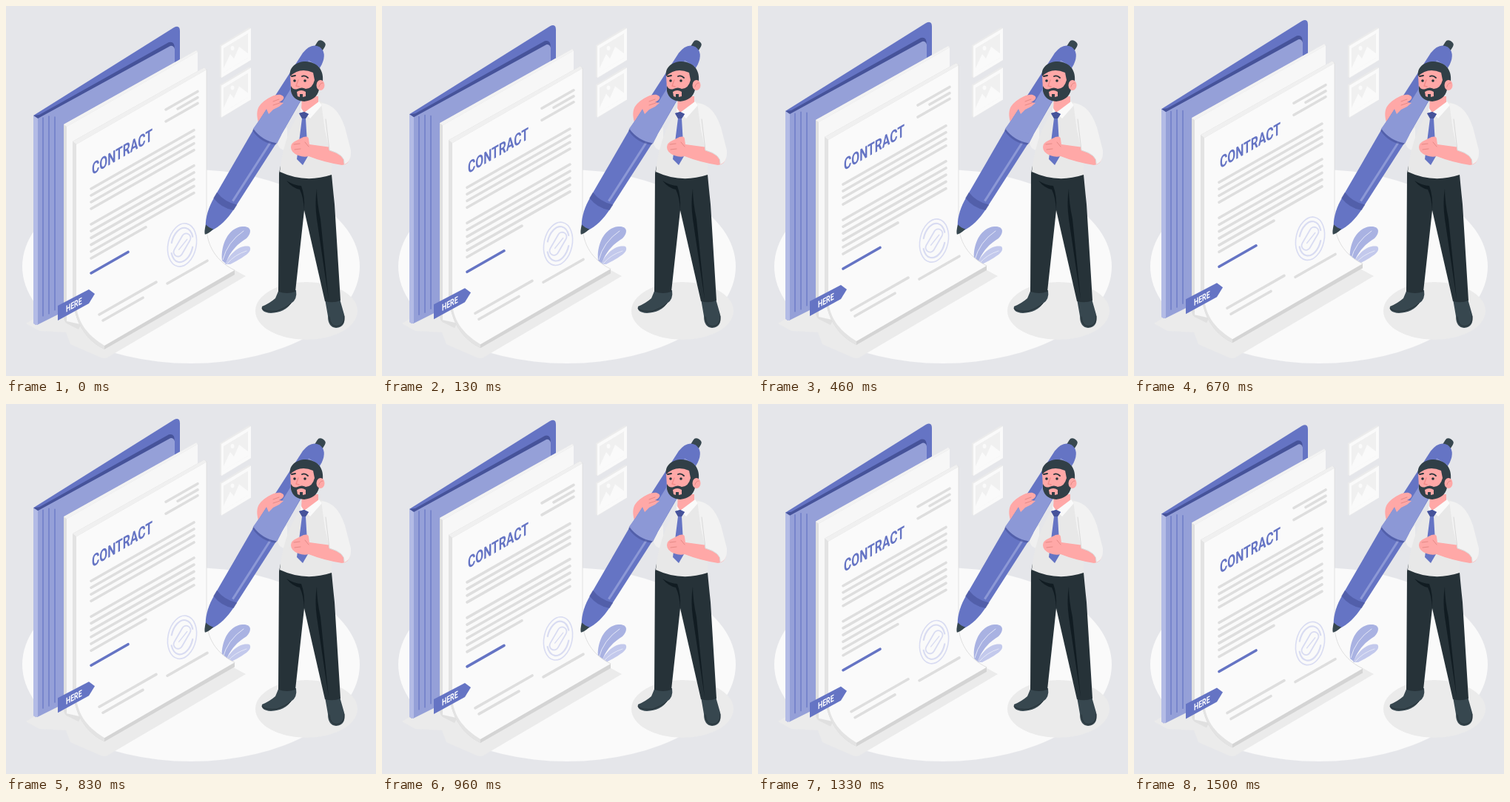
An HTML page that plays this animation: 500x500 px, repeating every 1540 ms.

```html
<!DOCTYPE html>
<html lang="en">
<head>
<meta charset="utf-8">
<title>Contract</title>
<style>
html, body { margin: 0; width: 100%; height: 100%; overflow: hidden; background: #e5e6ea }
svg { display: block; width: 100vw; height: 100vh }
text { font-family: Roboto, "Liberation Sans", sans-serif; font-weight: 700 }
.blue { fill: #6574c4 }
.pale { fill: #8c98d6 }
.deep { fill: #46539a }
.dark { fill: #263238 }
.hair { fill: #313f47 }
.skin { fill: #ffa8a7 }
.line { fill: none; stroke-linecap: round; stroke-linejoin: round }
</style>
</head>
<body>
<svg viewBox="0 0 500 500">
  <defs>
    <g id="picture">
      <path fill="#ebebeb" d="M289 53l39-24 3 1v43l-39 24-3-1z"/>
      <path fill="#fafafa" d="M291 54l40-24v43l-40 24z"/>
      <path fill="#f0f0f0" d="M294 57l33-20v33l-33 20z"/>
      <path fill="#fafafa" d="M294 84l9-19 5 6 7-16 12 9v6l-33 20z"/>
      <ellipse cx="306" cy="57" rx="2.4" ry="3" fill="#fafafa"/>
    </g>
  </defs>

  <ellipse cx="250" cy="352" rx="228" ry="131" fill="#fafafa"/>
  <path fill="#ebebeb" d="M27 429L60 409 300 352 324 365 137 475q-4 2-9 0L87 457l-6-16-36-2z"/>
  <ellipse cx="406" cy="412" rx="69" ry="39" fill="#ebebeb"/>
  <use href="#picture"/>
  <use href="#picture" y="53.5"/>

  <g id="leaves">
    <path fill="#a9b2e2" d="M292 344C290 323 300 300 319 298 333 297 332 307 325 314 314 321 303 330 297 348z"/>
    <path fill="#c3c9ec" d="M296 349C303 333 317 322 329 325 334 332 322 339 303 349z"/>
    <path class="line" stroke="#e4e7f7" d="M293 343Q299 319 321 304M299 348Q309 336 325 331"/>
  </g>

  <g id="document">
    <path class="blue" d="M37 148L227 29Q235 25 235 34V310L40 431z"/>
    <path fill="#95a0d8" d="M42 152L221 52Q228 50 228 59V330L82 411 42 431z"/>
    <path class="deep" d="M37 148l6 4L222 54q4-1 6 4 0-11-8-9L45 147z"/>
    <path fill="#b3bbe5" d="M37 148l6 4v278l-3 1-3-2z"/>
    <path class="line" stroke="#6574c4" stroke-width="1.2" d="M50 151v268M58 149v267M66 150v261"/>

    <path fill="#e0e0e0" d="M78 160L257 60l2 2v60L98 437 82 429q-4-3-4-9z"/>
    <path fill="#f7f7f7" d="M82 163L259 62v90L100 430 82 426z"/>
    <path fill="#f3f3f3" d="M78 160L257 60l2 2L82 163z"/>

    <path fill="#d4d4d4" d="M90 183L268 83l3 3V300C272 330 290 348 309 357V363L133 464C105 450 90 423 90 385z"/>
    <path fill="#e3e3e3" d="M90 183l5 4V400C97 430 115 448 133 459V464C105 450 90 423 90 385z"/>
    <path fill="#f0f0f0" d="M90 183L268 83l3 3L95 187z"/>
    <path fill="#fafafa" d="M95 187L271 86V300C272 330 290 348 309 357L133 459C115 448 95 430 95 400z"/>
    <path class="line" stroke="#dcdcdc" stroke-width=".8" d="M271 86V300C272 330 290 348 309 357"/>

    <text class="blue" font-size="22.5" transform="matrix(.7 -.404 0 1 116 228.5)">CONTRACT</text>
    <g id="copy" class="line" stroke="#dedede" stroke-width="3.6"></g>
    <g class="line" stroke="#d9dcf2" transform="translate(238 323) rotate(12)">
      <ellipse rx="19" ry="29.5" stroke-width="1.6"/>
      <ellipse rx="14.5" ry="23.5" stroke-width="2.2" stroke-dasharray="46 14"/>
      <rect x="-6" y="-17" width="12" height="34" rx="6" stroke-width="1.8" transform="rotate(18)"/>
      <path stroke-width="1.4" d="M-3 7L5-9"/>
    </g>

    <path class="blue" d="M70 405L112 383l8 6-8 13-42 23z"/>
    <text fill="#fff" font-size="12.5" transform="matrix(.7 -.38 0 1 81 414)">HERE</text>
  </g>

  <g id="man">
    <path fill="#37474f" d="M369 383q10 5 23 1 2 13-7 18-8 12-27 13-14-1-12-9 10-4 18-11zM431 396h20l6 21q3 17-11 18-11-1-11-16z"/>
    <path class="line" stroke="#263238" d="M346 409q7 5 20 3 12-4 19-10M437 420q1 13 10 13 11-2 10-14"/>
    <path class="dark" d="M371 216h68q2 24 5 52l8 130q-10 4-21 1L403 276 391 386q-11 4-23 0l1-160z"/>
    <path fill="#111c22" d="M379 236q11 7 20 7 5 13 4 33-1-18-6-28-10-2-18-12zM420 247q0 18 5 41l11 108-16-108q-3-22 0-41z"/>

    <path class="skin" d="M344 166C338 150 337 139 346 131 354 124 364 119 371 120 378 122 376 127 369 130L375 131 369 136 361 140 356 156z"/>
    <path fill="#f0f0f0" d="M362 178l18-14v34l-10-6z"/>
  </g>

  <g id="pen" transform="translate(270 307) rotate(-58.6)">
    <path fill="#37474f" d="M288-6h11q5 0 5 6t-5 6h-11z"/>
    <path class="blue" d="M6-4C18-12 32-15 47-15.5L155-18 276-15Q294-13 295 0 294 13 276 15L155 18 47 15.5C32 15 18 12 6 4z"/>
    <path class="pale" d="M160-18L200-17V-4L272-3V14L160 18z"/>
    <path class="pale" d="M56 7L150 9V12L56 10z"/>
    <path class="deep" opacity=".6" d="M46-16Q40 0 46 16l9 0Q49 0 55-16z"/>
    <path class="pale" d="M154-19Q146 0 154 19l13-1Q159 0 167-18z"/>
    <path class="deep" opacity=".6" d="M154-19Q146 0 154 19l-3-1Q143 0 151-18z"/>
    <path fill="#37474f" d="M-2 0Q0-3 10-6 8 0 10 6 0 3-2 0z"/>
  </g>

  <g id="front">
    <path class="skin" d="M348 130C356 124 364 119 371 120 378 122 376 127 369 130L375 131 369 136 361 140 355 146z"/>
    <path class="line" stroke="#e58986" d="M361 129l8-3M361 134l9-3"/>
    <path fill="#e8e8e8" d="M398 139L420 127Q438 132 441 153L440 228Q404 240 370 224 372 197 384 167z"/>
    <path class="skin" d="M400 122h22v12q-10 8-18 11l-5-4z"/>
    <path fill="#fafafa" d="M398 137l5 7 20-15 4 5-16 18-7-7-5 5z"/>
    <path class="blue" d="M396 145l7-2 6 3-4 6 3 51-7 12-8-8 7-55z"/>
    <path class="deep" d="M396 145l7-2 6 3-4 6h-5z"/>

    <path class="skin" d="M465 204q-1 10-11 11-25-4-45-12-6 2-14-1-10-4-10-11 0-6 7-9l10-5q7-2 7 3l1 7 37 5 10 6z"/>
    <path class="line" stroke="#e58986" d="M389 187l8-1M390 194l8-1M404 184l5 6"/>
    <path fill="#f2f2f2" d="M426 131C443 133 452 146 458 164L466 195Q467 211 457 214 459 202 437 195L431 168z"/>
    <path class="line" stroke="#d9d9d9" d="M432 153l5 42q22 6 20 18"/>

    <path class="skin" d="M384 93q2-11 17-10l21 8v25q-9 12-23 11-13-3-14-14z"/>
    <path class="hair" d="M384 95C382 83 392 75 405 75 421 76 430 86 428 103L423 113Q420 127 403 129 388 128 385 115L385 108Q388 114 394 112q6-3 11 0 9 0 12-12l-2-10Q397 82 384 95z"/>
    <ellipse class="skin" cx="425" cy="107" rx="5.5" ry="7"/>
    <path class="line" stroke="#e58986" d="M423 109q1-5 5-5"/>
    <path class="skin" d="M393 116q6-4 12 0v6l-4 1v-4h-4v4l-3-1z"/>
    <path class="line" stroke="#f28b89" stroke-width="1.4" d="M395 100l-3 8 4 1"/>
    <path class="line" stroke="#263238" stroke-width="1.8" d="M386 95l5-1M400 95q4-2 8 2"/>
    <circle class="dark" cx="390" cy="101" r="1.8"/>
    <circle class="dark" cx="404" cy="101" r="1.8"/>
  </g>
</svg>
<script>
const PERIOD = 1540, RISE = 10, LEAD = 55, SLOPE = 0.57;
const paper = document.getElementById('document');
const copy = document.getElementById('copy');

// A line of placeholder copy running up along the page
function rule(x1, y1, x2, color) {
  const path = document.createElementNS('http://www.w3.org/2000/svg', 'path');
  path.setAttribute('d', `M${x1} ${y1}L${x2} ${y1 - (x2 - x1) * SLOPE}`);
  if (color) path.setAttribute('stroke', color);
  copy.append(path);
}

for (let i = 0; i < 4; i++) rule(115, 247 + i * 9, 254);
for (let i = 0; i < 6; i++) rule(115, 295 + i * 9.2, i < 5 ? 254 : 189);
rule(216, 140, 259);
rule(232, 139, 259);
rule(216, 156, 259);
rule(115, 361, 165, '#6574c4');
rule(126, 417, 203);
rule(131, 425, 185);
rule(218, 375, 272);

function draw(now) {
  const phase = ((now + LEAD) % PERIOD) / PERIOD;
  const lift = RISE * (1 - Math.abs(1 - 2 * phase));
  paper.setAttribute('transform', `translate(0 ${0.7 - lift})`);
}

const start = performance.now();
function tick() {
  draw(performance.now() - start);
  requestAnimationFrame(tick);
}
tick();
</script>
</body>
</html>
```
